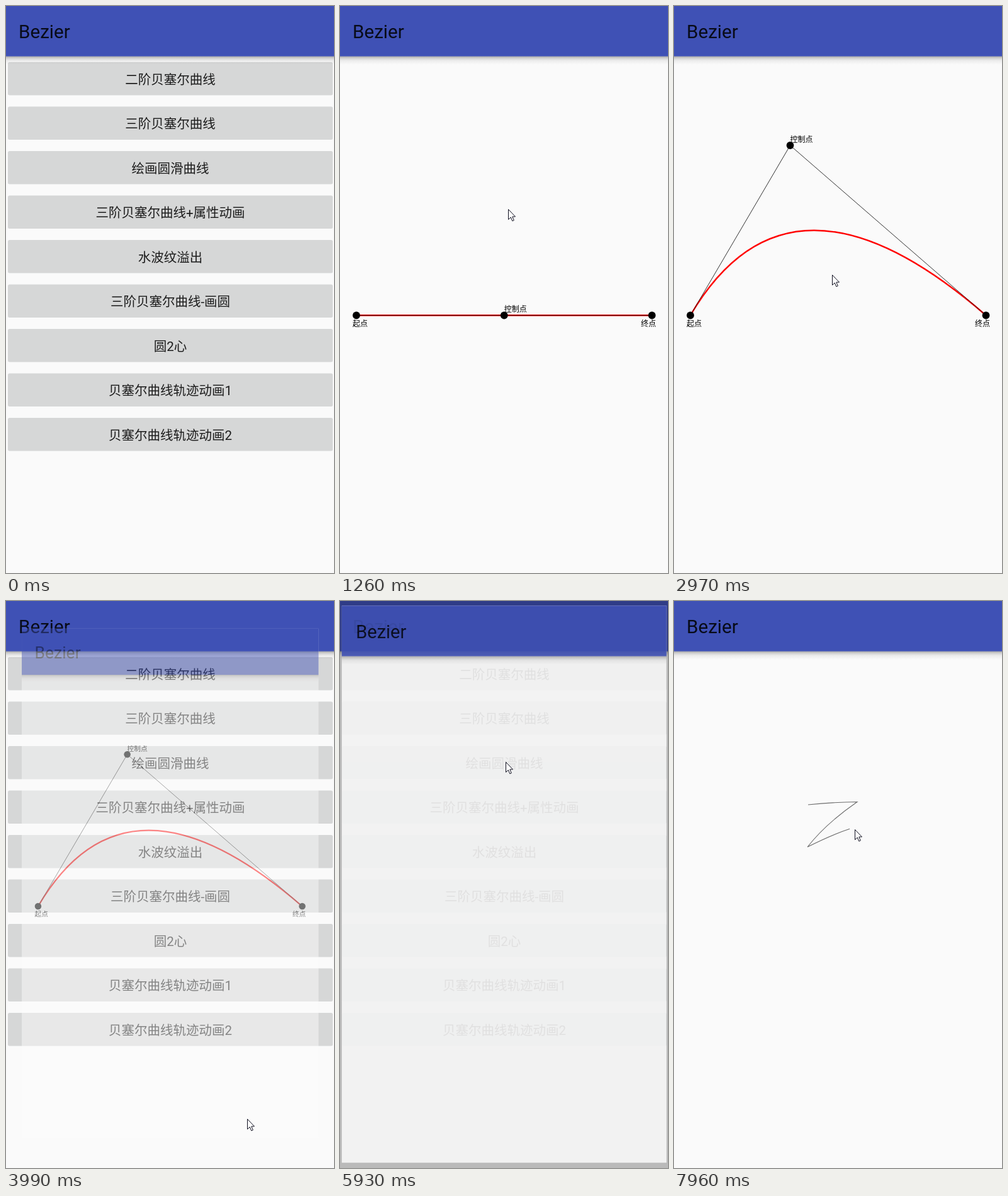
Recreate the animation shown at these times as an HTML page. Size 521 by 899 pixels, loop 8000 ms.

```html
<!DOCTYPE html>
<html lang="zh">
<head>
<meta charset="utf-8">
<title>Bezier</title>
<style>
  html, body { margin: 0; width: 100%; height: 100%; overflow: hidden; background: #000; }
  svg { display: block; width: 521px; height: 899px; }
  text { font-family: Roboto, "Noto Sans CJK SC", "Noto Sans CJK", sans-serif; }
  .item { font-size: 20.5px; text-anchor: middle; fill: #1c1c1c; }
  .label { font-size: 12px; }
</style>
</head>
<body>
<svg viewBox="0 0 521 899">
  <defs>
    <linearGradient id="shade" x2="0" y2="1">
      <stop offset="0" stop-opacity=".38"/>
      <stop offset=".15" stop-opacity=".2"/>
      <stop offset=".5" stop-opacity=".06"/>
      <stop offset="1" stop-opacity="0"/>
    </linearGradient>
    <g id="bar">
      <rect x="-3" y="79.8" width="527.5" height="13" fill="url(#shade)"/>
      <rect x="-3" y="-2.2" width="527.5" height="82" fill="#3f51b5"/>
      <text x="20" y="50.5" font-size="29.6" fill="#080b18">Bezier</text>
    </g>
    <rect id="page" x="-3" y="-2.2" width="527.5" height="903.2" fill="#fafafa"/>
  </defs>
  <rect width="521" height="899"/>
  <g id="list">
    <use href="#page"/>
    <g id="items"></g>
    <use href="#bar"/>
  </g>
  <g id="win">
    <use href="#page"/>
    <use href="#bar"/>
    <g id="quad">
      <path id="curve" fill="none" stroke="#f00" stroke-width="2.4"/>
      <path id="arms" fill="none" stroke="#000" stroke-opacity=".8"/>
      <circle cx="26" cy="490.5" r="5.9"/>
      <circle cx="495.5" cy="490.5" r="5.9"/>
      <text class="label" x="20" y="508">起点</text>
      <text class="label" x="478" y="508">终点</text>
      <g id="control">
        <circle r="5.9"/>
        <text class="label" y="-5.5">控制点</text>
      </g>
    </g>
    <path id="stroke" fill="none" stroke="#6c6c6c" stroke-width="1.1"
      d="M213 323Q250 319 291 318.5Q241 353 212 390Q252 370 280 361L287 362"/>
  </g>
  <path id="cursor" fill="#fff" stroke="#101020" d="M.5 .5V16.5L4.3 13L6.8 18.9L9.3 17.8L6.8 12H11.5Z"/>
</svg>
<script>
const LOOP = 8000, LAG = 73;
const OPEN_QUAD = 795, CLOSE_QUAD = 3924, OPEN_DRAW = 5775;
const DRAG_START = 1790, DRAG_END = 2587, DRAW_START = 7270, DRAW_END = 7960;
const START = [26, 490.5], END = [495.5, 490.5], REST = [260.75, 490.5];
const el = id => document.getElementById(id);

const clamp = v => Math.min(1, Math.max(0, v));
const easeOut = (v, power) => 1 - (1 - clamp(v)) ** power;
const smooth = v => v * v * (3 - 2 * v);

const ENTRY = [455, 905];
const move = (from, to, x, y) => ({ from, to, target: [x, y] });
const moves = [
  move(52, 570, 271, 130),
  move(1100, 1600, 264, 486),
  move(DRAG_START, 1977, 290, 334),
  move(1977, 2250, 353, 293),
  move(2250, DRAG_END, 188, 225),
  move(2910, 3290, 400, 905),
  move(3930, 4910, 256, 207),
  move(5370, 5630, 263, 255),
  move(6050, 6540, 300, 373),
  move(6570, 7110, 213, 323)
];

function drawnLength(t) {
  return el('stroke').getTotalLength() * smooth(clamp((t - DRAW_START) / (DRAW_END - DRAW_START)));
}

function cursorAt(t) {
  if (t > DRAW_START) {
    const p = el('stroke').getPointAtLength(drawnLength(t));
    return [p.x, p.y];
  }
  return moves.reduce((pos, { from, to, target }) => {
    const f = easeOut((t - from) / (to - from), 2);
    return pos.map((v, i) => v + (target[i] - v) * f);
  }, ENTRY);
}

// The dragged point trails the cursor a little.
function controlAt(t) {
  if (t - LAG < DRAG_START) return REST;
  const [x, y] = cursorAt(Math.min(t - LAG, DRAG_END));
  return [x - 3.5, y - 4];
}

function drawWindow(t) {
  const closing = t >= CLOSE_QUAD && t < OPEN_DRAW;
  const begin = closing ? CLOSE_QUAD : t < CLOSE_QUAD ? OPEN_QUAD : OPEN_DRAW;
  const eased = easeOut((t - begin) / 300, 3);
  const shown = closing ? 1 - eased : eased;
  el('list').setAttribute('opacity', closing ? 1 : 1 - 0.285 * shown);
  el('win').setAttribute('opacity', shown);
  el('win').setAttribute('transform',
    `translate(260.75 430.2) scale(${0.8 + 0.2 * shown}) translate(-260.75 -430.2)`);
}

function render(t) {
  drawWindow(t);

  const c = controlAt(t);
  el('quad').style.display = t < OPEN_DRAW ? '' : 'none';
  el('curve').setAttribute('d', `M${START}Q${c} ${END}`);
  el('arms').setAttribute('d', `M${START}L${c}L${END}`);
  el('control').setAttribute('transform', `translate(${c})`);

  const length = drawnLength(t - LAG);
  el('stroke').style.display = length > 0 ? '' : 'none';
  el('stroke').setAttribute('stroke-dasharray', `${length} 999`);

  el('cursor').setAttribute('transform', `translate(${cursorAt(t).map(Math.round)})`);
}

el('items').innerHTML = [
  '二阶贝塞尔曲线', '三阶贝塞尔曲线', '绘画圆滑曲线', '三阶贝塞尔曲线+属性动画', '水波纹溢出',
  '三阶贝塞尔曲线-画圆', '圆2心', '贝塞尔曲线轨迹动画1', '贝塞尔曲线轨迹动画2'
].map((name, i) => {
  const y = 89 + 70.5 * i;
  return `<rect x="3" y="${y}" width="516" height="52.6" rx="2.5" fill="#d6d7d7"/>
    <text class="item" x="261" y="${y + 34.5}">${name}</text>`;
}).join('');

const began = performance.now();
function tick() {
  render((performance.now() - began) % LOOP);
  requestAnimationFrame(tick);
}
tick();
</script>
</body>
</html>
```
